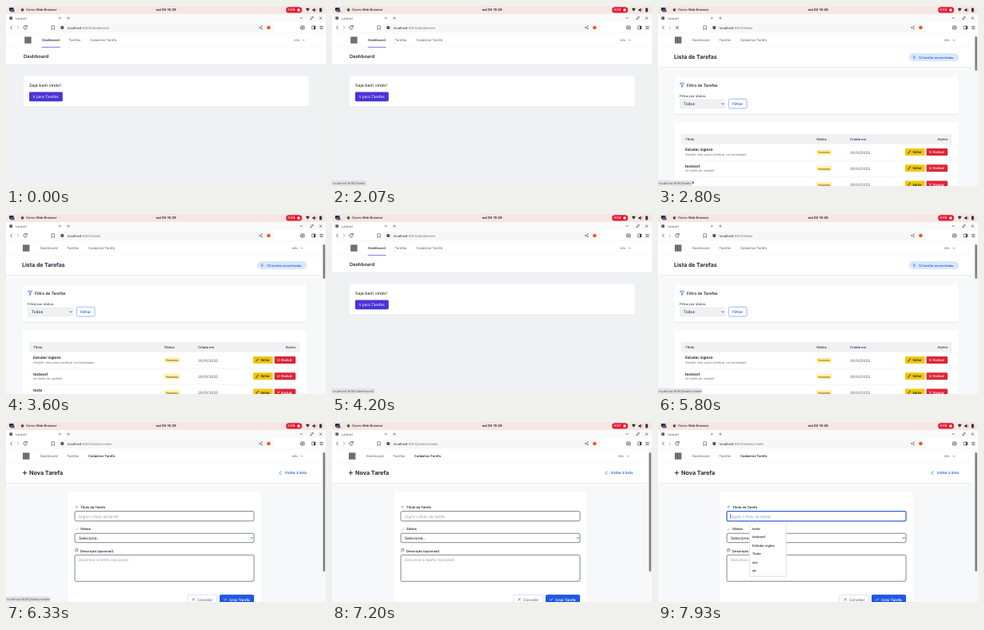
An HTML page for the animation above (8 s loop, 400 by 225 pixels).

```html
<!DOCTYPE html>
<html lang="pt-BR">
<head>
<meta charset="utf-8">
<title>Tarefas</title>
<style>
html, body { margin: 0; width: 100%; height: 100%; overflow: hidden; background: #fff; }
svg { display: block; width: 100vw; height: 100vh; }
text { font-family: Inter, "Open Sans", sans-serif; text-rendering: geometricPrecision; white-space: pre; }
</style>
</head>
<body>
<svg id="stage" viewBox="0 0 400 225"></svg>
<script>
const LOOP = 8000;
const INK = '#1f2937', GREY = '#6b7280', BLUE = '#2563eb';

const box = (x, y, w, h, fill, r = 0, more = '') =>
  `<rect x="${x}" y="${y}" width="${w}" height="${h}" rx="${r}" fill="${fill}" ${more}/>`;
const text = (x, y, size, str, fill = INK, weight = 400, more = '') =>
  `<text x="${x}" y="${y}" font-size="${size}" fill="${fill}" font-weight="${weight}" ${more}>${str}</text>`;
const line = (d, color = '#333', width = 0.7, more = '') =>
  `<path d="${d}" fill="none" stroke="${color}" stroke-width="${width}" stroke-linecap="round" stroke-linejoin="round" ${more}/>`;
const dot = (x, y, r, fill) => `<circle cx="${x}" cy="${y}" r="${r}" fill="${fill}"/>`;
const group = (id, content) => `<g id="${id}">${content}</g>`;
const cross = (x, y, r, color, width) =>
  line(`M${x - r} ${y - r}l${2 * r} ${2 * r}m0 ${-2 * r}l${-2 * r} ${2 * r}`, color, width);
const plus = (x, y, r, color, width) =>
  line(`M${x - r} ${y}h${2 * r}M${x} ${y - r}v${2 * r}`, color, width);
const check = (x, y, color) => line(`M${x - 1.6} ${y}l1.2 1.3l2.2 -2.6`, color);
const chevron = (x, y, color = '#333', r = 1.2) => line(`M${x - r} ${y - r / 2}l${r} ${r}l${r} ${-r}`, color);
const card = (x, y, w, h) =>
  box(x, y + 0.8, w, h, '#e3e6ea', 3) + box(x, y, w, h, '#fff', 3, 'stroke="#eceef1" stroke-width=".4"');

function topBar() {
  return box(0, 0, 400, 10, '#f6e6e1')
    + box(4, 2, 5.5, 4, '#23314d', 0.6) + box(5.5, 4, 5, 3.5, '#4c5a73', 0.6)
    + dot(20.5, 4.8, 1.9, '#555')
    + text(25, 6.3, 4, 'Corvo Web Browser', '#333', 600)
    + text(187.5, 6.3, 4, 'out 29  15:29', '#222', 700)
    + box(350, 1.2, 20, 7.4, '#e01b32', 3.7)
    + text(352.2, 6.4, 4, '', '#fff', 600, 'id="timer"')
    + box(364.3, 3.4, 3, 3, '#fff', 0.5)
    + `<path d="M374.7 3.6q2.4 -2 4.8 0l-2.4 3.2z" fill="#333"/>`
    + `<path d="M383.2 4h1.2l1.7 -1.5v5l-1.7 -1.5h-1.2z" fill="#333"/>`
    + line('M387.1 3.6q1 1.3 0 2.7', '#333', 0.5)
    + box(391.8, 2.6, 3, 4.8, '#333', 0.6);
}

function browserBar() {
  return box(0, 10, 400, 23, '#fafafa')
    + box(0, 10.3, 73, 10, '#fff', 1.5) + box(0, 20, 400, 13, '#fff')
    + box(65, 21.4, 270, 11, '#f7f7f7', 2)
    + group('favicon', box(4.3, 13.2, 3.8, 3.8, '#60646a', 0.6))
    + group('spinner', line('M4.6 16.2a2.1 2.1 0 0 1 3.4 -2.4', '#b8bcc2', 0.6))
    + text(12, 16.6, 4, 'Laravel', '#555')
    + cross(67.3, 15.2, 0.9, '#333', 0.5) + plus(78, 15.2, 1.4, '#444', 0.5)
    + chevron(369, 15.2) + line('M380.8 16.6l3 -3m-1.6 0h1.6v1.6m-3 -.2v1.6h1.6', '#333', 0.5)
    + cross(393.3, 15.2, 1.3, '#333', 0.6)
    + line('M7.4 25.2l-1.9 1.8l1.9 1.8', '#333') + line('M14.2 25.2l1.9 1.8l-1.9 1.8', '#aaa')
    + group('reload', line('M26 25.6a2.2 2.2 0 1 0 .2 2.2M26.2 24.3v1.6h-1.6', '#333', 0.7))
    + group('stop', cross(24.2, 27, 1.6, '#333', 0.7))
    + line('M57.2 24.8h3.4v4.6l-1.7 -1.3l-1.7 1.3z', '#444', 0.6)
    + dot(70.3, 27, 2.1, '#30343a') + line('M69.2 27h2.2', '#fff', 0.5)
    + `<text y="28.5" font-size="4.15" fill="#777"><tspan x="77" fill="#222">localhost</tspan><tspan id="url"></tspan></text>`
    + line('M319.7 25.6l-2.8 1.4l2.8 1.4', '#555', 0.5)
    + [[319.8, 25.5], [316.8, 27], [319.8, 28.5]].map(([x, y]) => dot(x, y, 0.7, '#555')).join('')
    + dot(328.3, 27, 2.3, '#f0562b')
    + box(368.5, 25, 4.4, 4, 'none', 0.7, 'stroke="#333" stroke-width=".7"') + line('M369.7 27h2m-1 -1v2', '#333', 0.5)
    + box(382.2, 25, 4.4, 4, 'none', 0.5, 'stroke="#333" stroke-width=".6"') + box(384.8, 25, 1.8, 4, '#333')
    + line('M392.4 25.4h3.6m-3.6 1.6h3.6m-3.6 1.6h3.6', '#333', 0.6)
    + box(0, 32.8, 400, 0.4, '#e8e8e8');
}

function siteNav(shift, active) {
  const x = v => v - shift;
  const color = name => name === active ? '#111827' : GREY;
  return box(0, 33, 400, 19, '#fff')
    + box(x(23.2), 38.4, 8.4, 8.4, '#6b7076')
    + text(x(45.2), 44.3, 4.15, 'Dashboard', color('dashboard'), 500)
    + text(x(78.5), 44.3, 4.15, 'Tarefas', GREY, 500)
    + text(x(105), 44.3, 4.15, 'Cadastrar Tarefa', color('create'), 500)
    + text(360 - shift, 44.1, 4.1, 'nilo', GREY, 500) + chevron(372 - shift, 42.8, GREY, 1)
    + box(0, 51.8, 400, 0.4, '#e9ebee');
}

const scrollbar = height =>
  box(395, 33, 5, 192, '#f8f8f8') + box(396.2, 38, 2.8, height, '#858585', 1.4);

function dashboardPage() {
  return box(0, 33, 400, 192, '#eff1f3')
    + siteNav(0, 'dashboard') + box(44.7, 51.1, 23, 0.8, '#6366f1')
    + group('hoverTasks', box(78, 51.1, 16.5, 0.7, '#c4c8d0'))
    + box(0, 52.2, 400, 21, '#fff') + box(0, 73.2, 400, 0.7, '#e1e3e7')
    + text(22, 64.7, 5.9, 'Dashboard', INK, 600)
    + box(22, 88.5, 356.5, 38, '#e3e5e9', 2.5) + box(22, 87.6, 356.5, 38.2, '#fff', 2.5)
    + text(29, 100.6, 5.3, 'Seja bem vindo!', '#111827')
    + box(29, 107.6, 41.8, 11.6, '#4a34d6', 1.4)
    + text(33.6, 115.1, 4.7, 'Ir para Tarefas', '#fff');
}

function taskRow(y, title, note, date) {
  return text(34, y + 8.6, 4.65, title, '#111827', 600)
    + text(34, y + 14.1, 3.9, note, GREY)
    + box(197.5, y + 6.8, 20.6, 6.8, '#fef3a8', 3)
    + text(200, y + 11.5, 3.3, 'Pendente', '#854d0e', 600)
    + text(240, y + 11.8, 4.6, date, '#4b5563')
    + box(309, y + 5.3, 24.5, 9, '#f2c70c', 1.3)
    + line(`M312.6 ${y + 11.2}l.4 -1.2l2.2 -2.2l.8 .8l-2.2 2.2z`, INK, 0.6)
    + text(318.4, y + 11.3, 4.1, 'Editar', INK, 600)
    + box(335.5, y + 5.3, 26.5, 9, '#dc2638', 1.3)
    + cross(340.5, y + 9.8, 1.2, '#fff', 0.6)
    + text(344, y + 11.3, 4.1, 'Excluir', '#fff', 600)
    + box(29, y + 20, 338, 0.4, '#e5e7eb');
}

function tasksPage() {
  const rows = [
    ['Estudar inglesn', 'Assistir uma aula e praticar conversasaao', '30/10/2025'],
    ['testeee1', 'um teste do cadastr', '29/10/2025'],
    ['teste', '', '29/10/2025']
  ];
  return box(0, 33, 400, 192, '#f7f8fa') + siteNav(2.2)
    + box(0, 52.2, 395, 24, '#fff') + box(0, 76.2, 395, 0.6, '#e4e7ea')
    + text(20, 66.4, 6.95, 'Lista de Tarefas', INK, 700)
    + box(314, 59, 62, 10, '#d9e8fd', 5)
    + line('M320.6 61.9l-1.6 2.3h2.6l-1.7 2.2', BLUE, 0.6)
    + text(326, 65.5, 3.9, '32 tarefas encontradas', '#1d4ed8', 500)
    + card(20, 88, 356, 47)
    + line('M27.8 96.4h4.8l-1.9 2.4v2.2l-1 .5v-2.7z', BLUE, 0.7)
    + text(36, 100.5, 4.95, 'Filtro de Tarefas', INK, 600)
    + text(27, 114.3, 4.05, 'Filtrar por status:', '#374151', 500)
    + box(27, 116.6, 57, 11.8, '#eff0f2', 1.5) + text(32, 124.4, 4.8, 'Todos', '#111')
    + chevron(81, 122.4, '#222', 1.2)
    + box(88.3, 116.2, 22.7, 11.8, '#fff', 1.5, `stroke="#6f9cf3" stroke-width=".7"`)
    + text(93, 123.9, 4.6, 'Filtrar', BLUE, 600)
    + card(20, 145, 356, 90)
    + box(29, 160, 338, 12.6, '#eff1f3')
    + [[34, 'Título'], [198, 'Status'], [240, 'Criada em']].map(([x, s]) => text(x, 167.6, 4.1, s, '#374151', 600)).join('')
    + text(362, 167.6, 4.1, 'Ações', '#374151', 600, 'text-anchor="end"')
    + rows.map((row, i) => taskRow(172.8 + i * 20.2, ...row)).join('')
    + scrollbar(43);
}

function createPage() {
  const field = (y, h, id = '') =>
    box(86, y, 224, h, '#fff', 1.8, `stroke="#606872" stroke-width=".8" ${id}`);
  const label = (y, str) => text(93, y, 4.1, str, INK, 600);
  const choices = ['teste', 'testeee1', 'Estudar ingles', 'Teste', 'asc', 'aa'];
  return box(0, 33, 400, 192, '#f7f8fa') + siteNav(2.2, 'create')
    + box(0, 52.2, 395, 24, '#fff') + box(0, 76.2, 395, 0.6, '#e4e7ea')
    + plus(23.5, 63.6, 2.3, INK, 0.9) + text(29, 66.2, 7.2, 'Nova Tarefa', INK, 700)
    + line('M343.8 61.8l-1.8 1.9l1.8 1.9', BLUE, 0.8)
    + text(376, 65.3, 4.6, 'Voltar à lista', BLUE, 600, 'text-anchor="end"')
    + card(77, 87, 242, 145)
    + plus(88.2, 106.2, 1.4, '#60a5fa', 0.7) + label(107.7, 'Título da Tarefa')
    + field(111.6, 12.2, 'id="titleField"')
    + text(91, 119.5, 4.65, 'Digite o título da tarefa', '#9299a3')
    + check(88.2, 134, '#d8b43a') + label(135.4, 'Status')
    + field(139.2, 11.5) + text(91, 146.6, 4.85, 'Selecione...', '#111') + chevron(307.2, 145, '#111', 1.1)
    + box(86.5, 159, 2.4, 3, 'none', 0.4, 'stroke="#555" stroke-width=".5"')
    + line('M87.6 158.3h2v3', '#555', 0.5) + label(162.5, 'Descrição (opcional)')
    + field(166.2, 33) + text(91, 174, 4.65, 'Descreva a tarefa (opcional)', '#9299a3')
    + line('M307 198l2 -2', '#888', 0.4)
    + box(227, 216, 36.6, 13, '#fff', 1.8, 'stroke="#c5cad1" stroke-width=".6"')
    + cross(234.3, 221.8, 1.4, '#4b5563', 0.6) + text(239, 223.6, 4.6, 'Cancelar', '#4b5563')
    + box(267, 215.7, 43, 13.5, '#2058e2', 1.8)
    + check(274, 221.8, '#fff') + text(279, 223.6, 4.5, 'Criar Tarefa', '#fff', 600)
    + group('suggestions',
      box(90.3, 115, 0.5, 5.5, '#111')
      + box(114.2, 127, 46.3, 66.5, '#d9dce0', 1.2)
      + box(114.6, 126.8, 45.4, 66, '#fff', 1, 'stroke="#dfe1e5" stroke-width=".4"')
      + choices.map((s, i) => text(118, 134.5 + i * 10.55, 4.1, s, '#222', 500)).join(''))
    + scrollbar(149);
}

const stage = document.getElementById('stage');
stage.innerHTML = group('dashboard', dashboardPage()) + group('tasks', tasksPage())
  + group('create', createPage()) + browserBar() + topBar()
  + group('status', box(0, 218.6, 10, 6.8, '#e4e6e8', 0.8, 'id="statusBox" stroke="#c9ccd0" stroke-width=".4"')
    + text(1.2, 223.4, 4.05, '', '#555', 400, 'id="link"'));

const part = Object.fromEntries([...stage.querySelectorAll('[id]')].map(el => [el.id, el]));
const show = (id, on) => { part[id].style.display = on ? '' : 'none'; };
const ramp = (t, from, to) => Math.min(1, Math.max(0, (t - from) / (to - from)));
const latest = (steps, t) => steps.filter(([start]) => start <= t).pop()[1];

const pages = [[0, 'dashboard'], [2800, 'tasks'], [4200, 'dashboard'], [5330, 'tasks'], [6330, 'create']];
const paths = { dashboard: '/dashboard', tasks: '/tasks', create: '/tasks/create' };
const hovers = [[0, 'tasks'], [3600, 'dashboard'], [4800, 'tasks'], [5800, 'create']];
const linkWidths = { dashboard: 53, tasks: 42, create: 54 };
const loads = [[2730, 3070], [4130, 4200], [5200, 5400]];

function draw(t) {
  const page = latest(pages, t), hover = latest(hovers, t);
  for (const name in paths) show(name, name === page);
  part.url.textContent = ':8000' + paths[page];
  part.timer.textContent = '0:0' + Math.floor((t + 70) / 1000);

  const loading = loads.some(([from, to]) => t >= from && t < to);
  show('stop', loading);
  show('reload', !loading);
  const spinning = t >= 5200 && t < 5400;
  show('spinner', spinning);
  show('favicon', !spinning);

  part.link.textContent = 'localhost:8000' + paths[hover];
  part.statusBox.setAttribute('width', linkWidths[hover]);
  part.status.style.opacity = ramp(t, 1870, 2070) - ramp(t, 3070, 3270)
    + ramp(t, 3800, 3930) - ramp(t, 6930, 7200);
  part.hoverTasks.style.opacity = ramp(t, 4730, 5000);

  const focused = t >= 7530;
  show('suggestions', focused);
  part.titleField.setAttribute('stroke', focused ? '#2f66dc' : '#606872');
  part.titleField.setAttribute('stroke-width', focused ? 1.3 : 0.8);
}

const began = performance.now();
function tick() {
  draw((performance.now() - began) % LOOP);
  requestAnimationFrame(tick);
}
tick();
</script>
</body>
</html>
```
